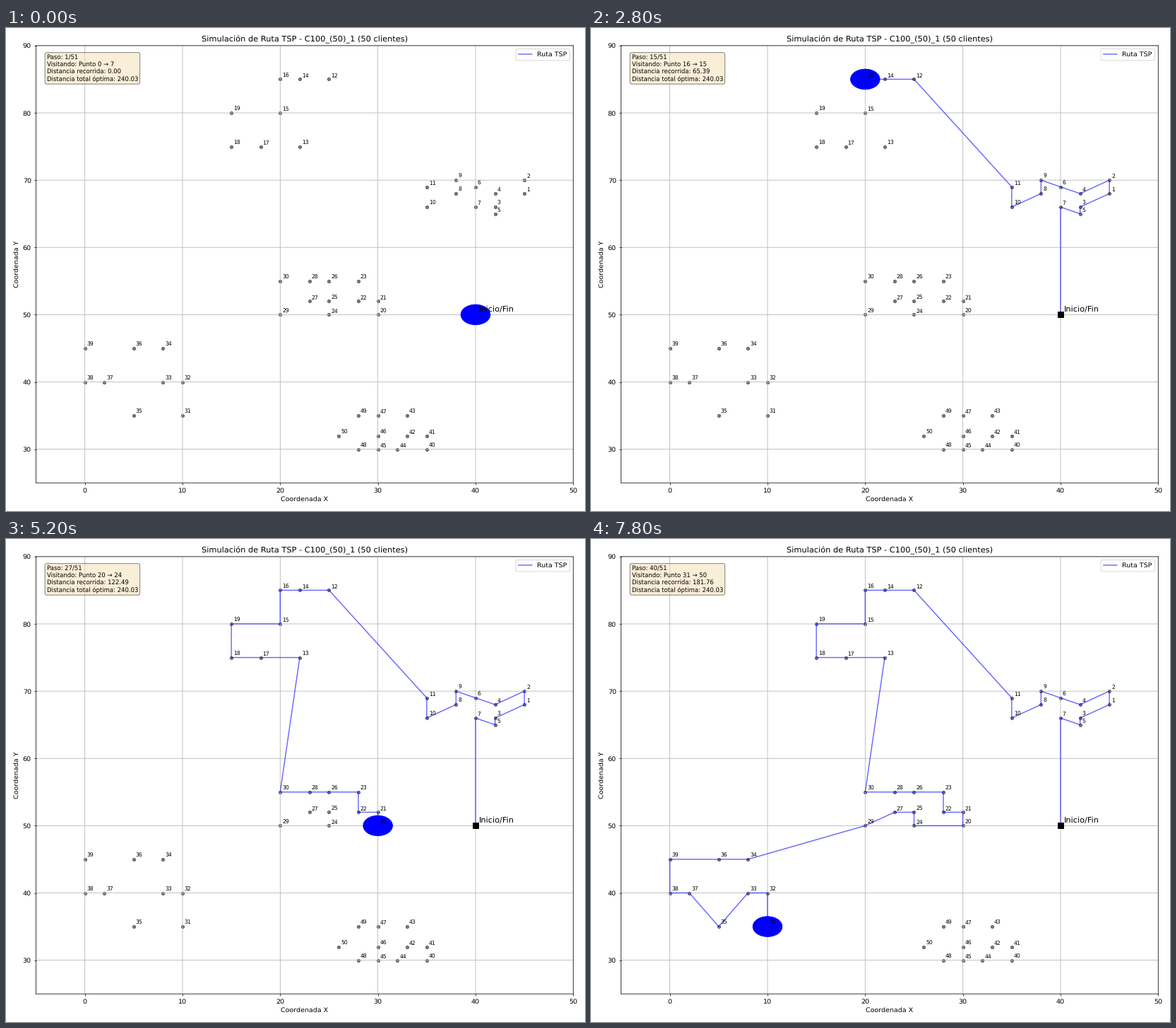
Write a matplotlib script that moves like this. It is 820 px wide and 683 px high and loops after 8000 ms.

```python
import numpy as np
import matplotlib.pyplot as plt
from matplotlib.animation import FuncAnimation
from matplotlib.patches import Circle

W, H = 820, 683
DPI = W / 12
STEPS, STEP_MS = 40, 200

plt.rcParams.update({"font.family": "DejaVu Sans", "text.hinting": "none",
                     "path.snap": False})


def cluster(x0, y0, columns):
    """Customers around a corner, given as {dx: heights}, right to left."""
    return [(x0 + dx, y0 + dy) for dx, heights in columns.items() for dy in heights]


depot = (40, 50)
points = np.array([
    depot,
    *cluster(35, 65, {10: (3, 5), 7: (1, 3, 0), 5: (4, 1), 3: (3, 5), 0: (1, 4)}),
    *cluster(15, 75, {10: (10,), 7: (0, 10), 5: (5, 10), 3: (0,), 0: (0, 5)}),
    *cluster(20, 50, {10: (0, 2), 8: (2, 5), 5: (0, 2, 5), 3: (2, 5), 0: (0, 5)}),
    *cluster(0, 35, {10: (0, 5), 8: (5, 10), 5: (0, 10), 2: (5,), 0: (5, 10)}),
    *cluster(25, 30, {10: (0, 2), 8: (2, 5), 7: (0,), 5: (0, 2, 5), 3: (0, 5), 1: (2,)}),
])
n = len(points)
dist = np.hypot(*(points[:, None] - points).T)


def legs(tour):
    return dist[tour, np.roll(tour, -1)]


def two_opt(tour):
    """Reverse the most rewarding stretch until none helps."""
    while True:
        nxt, leg = np.roll(tour, -1), legs(tour)
        gain = leg[:, None] + leg - dist[np.ix_(tour, tour)] - dist[np.ix_(nxt, nxt)]
        np.fill_diagonal(gain, 0)
        i, j = sorted(np.unravel_index(gain.argmax(), gain.shape))
        if gain[i, j] < 1e-9:
            return tour
        tour[i + 1:j + 1] = tour[i + 1:j + 1][::-1].copy()


def solve(tries=2000, window=12):
    """Swap neighbouring stretches at random and repair with 2-opt."""
    rng = np.random.default_rng(1)
    best = two_opt(np.arange(n))
    for _ in range(tries):
        start = rng.integers(1, n - window + 1)
        a, b, c = start + np.sort(rng.choice(window + 1, 3, replace=False))
        tour = two_opt(np.concatenate([best[:a], best[b:c], best[a:b], best[c:]]))
        if legs(tour).sum() < legs(best).sum() - 1e-9:
            best = tour
    if best[1] > best[-1]:
        best[1:] = best[:0:-1].copy()
    return best


route = solve()
path = points[route]
total = legs(route).sum()
travelled = np.concatenate([[0], np.cumsum(legs(route))])

fig = plt.figure(figsize=((W + 0.01) / DPI, (H + 0.01) / DPI), dpi=DPI)
left, right, top, bottom = 42.5, 803.3, 24.9, 643.2
ax = fig.add_axes([left / W, 1 - bottom / H, (right - left) / W, (bottom - top) / H])
ax.set(xlim=(-5, 50), ylim=(25, 90), xlabel="Coordenada X", ylabel="Coordenada Y")
ax.set_title("Simulación de Ruta TSP - C100_(50)_1 (50 clientes)")
ax.grid(True)


def label(text, xy, offset, size):
    ax.annotate(text, xy, xytext=(offset, offset), textcoords="offset points",
                fontsize=size)


ax.scatter(*points[1:].T, c="black", s=20, alpha=0.5)
for i, xy in enumerate(points[1:], 1):
    label(str(i), xy, 3, 8)
ax.plot(*depot, "ks", markersize=8.5, zorder=2.2)
label("Inicio/Fin", depot, 5, 12)

line, = ax.plot([], [], color="blue", lw=1.5, alpha=0.6, label="Ruta TSP")
vehicle = ax.add_patch(Circle(depot, 1.5, color="blue", zorder=2.5))
info = ax.text(0.02, 0.98, "", transform=ax.transAxes, va="top", fontsize=9,
               bbox=dict(boxstyle="round", facecolor="wheat", alpha=0.5))
ax.legend(loc="upper right")


def update(k):
    line.set_data(*path[:k + 1].T)
    vehicle.center = tuple(path[k])
    info.set_text(f"Paso: {k + 1}/{n}\n"
                  f"Visitando: Punto {route[k]} → {route[k + 1]}\n"
                  f"Distancia recorrida: {travelled[k]:.2f}\n"
                  f"Distancia total óptima: {total:.2f}")
    return line, vehicle, info


anim = FuncAnimation(fig, update, frames=STEPS, interval=STEP_MS,
                     init_func=lambda: update(0), repeat=True, repeat_delay=0)
plt.show()
```
